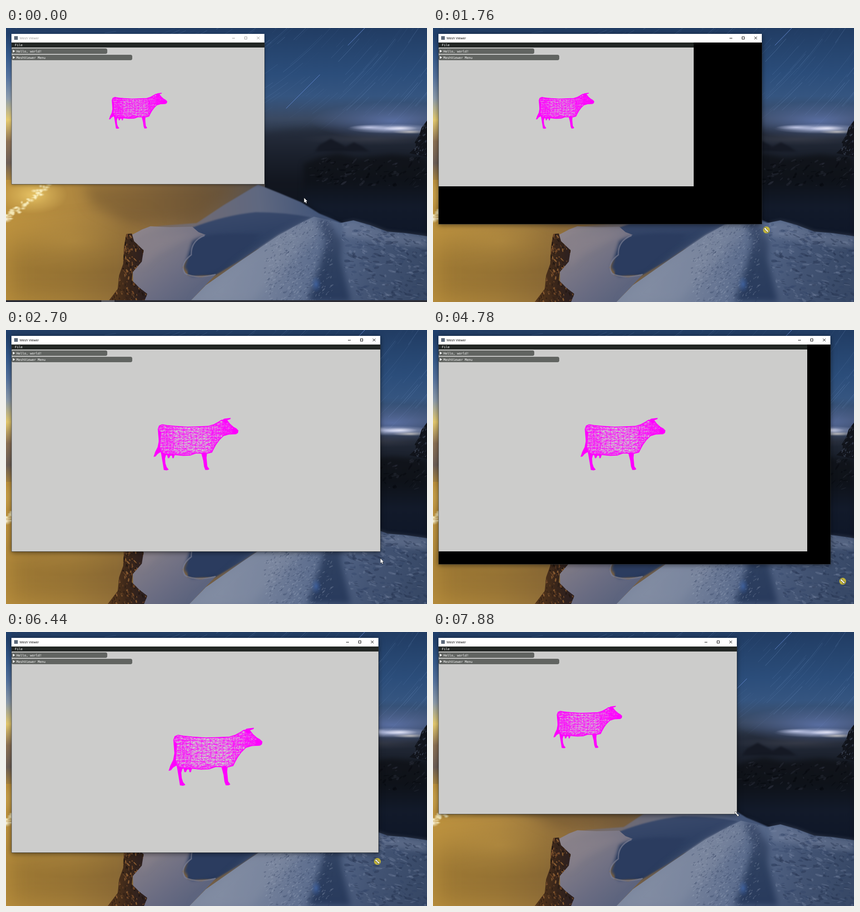
Write an HTML page with a canvas that moves like this. It is 927 px wide and 604 px high and loops after 8 s.

```html
<!DOCTYPE html>
<html lang="en">
<head>
<meta charset="utf-8">
<title>Mesh Viewer</title>
<style>
html, body { margin: 0; width: 100%; height: 100%; overflow: hidden; background: #141b28; }
canvas { display: block; }
</style>
</head>
<body>
<canvas id="stage" width="927" height="604"></canvas>
<script>
const W = 927, H = 604, LOOP = 8000;
const LEFT = 12, TOP = 13, CLIENT_TOP = 31;
const stage = document.getElementById('stage').getContext('2d');

let seed = 77;
const random = (min = 0, max = 1) => {
  seed = seed * 16807 % 2147483647;
  return min + (max - min) * seed / 2147483647;
};

// ---------- wallpaper ----------
function paintWallpaper() {
  const canvas = document.createElement('canvas');
  canvas.width = W;
  canvas.height = H;
  const c = canvas.getContext('2d');

  const linear = (x0, y0, x1, y1, ...colors) => {
    const g = c.createLinearGradient(x0, y0, x1, y1);
    colors.forEach((color, i) => g.addColorStop(i / (colors.length - 1), color));
    return g;
  };
  const shape = (path, fill, blur = 0) => {
    c.filter = blur ? `blur(${blur}px)` : 'none';
    c.fillStyle = fill;
    c.fill(new Path2D(path));
    c.filter = 'none';
  };
  const glow = (x, y, rx, ry, rgb, alpha = 1) => {
    const g = c.createRadialGradient(0, 0, 0, 0, 0, 1);
    g.addColorStop(0, `rgba(${rgb},${alpha})`);
    g.addColorStop(.5, `rgba(${rgb},${alpha * .45})`);
    g.addColorStop(1, `rgba(${rgb},0)`);
    c.save();
    c.translate(x, y);
    c.scale(rx, ry);
    c.fillStyle = g;
    c.fillRect(-1, -1, 2, 2);
    c.restore();
  };
  // Random flecks kept inside a shape
  const flecks = (path, count, [x0, y0, x1, y1], colors, size, tilt) => {
    c.save();
    c.clip(new Path2D(path));
    for (let i = 0; i < count; i++) {
      c.fillStyle = colors[i % colors.length];
      c.beginPath();
      c.ellipse(random(x0, x1), random(y0, y1), random(1, size), random(.5, size * .35), tilt + random(-.5, .5), 0, 7);
      c.fill();
    }
    c.restore();
  };

  // Sky and star trails
  c.fillStyle = linear(0, 0, 0, 300, '#213c63', '#26456f', '#2b4d7a', '#355580', '#3a4962', '#212936', '#151a23');
  c.fillRect(0, 0, W, H);
  c.lineCap = 'round';
  for (let i = 0; i < 620; i++) {
    const r = random(505, 1080), a = random(.5, 1.9);
    const y = -500 + r * Math.sin(a);
    if (y > 205) continue;
    c.strokeStyle = `rgba(140,175,225,${random(.05, .36) * Math.min(1, (215 - y) / 90)})`;
    c.lineWidth = random(.4, 1);
    c.beginPath();
    c.arc(150, -500, r, a, a + random(.03, .13));
    c.stroke();
  }
  c.strokeStyle = '#6488d2';
  c.lineWidth = 1;
  c.stroke(new Path2D('M617 177L691 103M753 38L790 0'));

  // Horizon
  shape('M560 235Q700 205 927 238V480H560Z', linear(0, 215, 0, 400, '#283040', '#1b212d', '#12161f', '#0f141f'), 8);
  glow(850, 205, 180, 42, '105,130,195', .65);
  glow(850, 222, 100, 11, '205,212,245', .85);
  glow(800, 219, 45, 6, '220,225,255', .7);
  glow(868, 221, 38, 6, '240,240,255', .8);
  glow(890, 229, 40, 5, '250,240,225', .6);
  glow(800, 245, 150, 14, '70,72,84', .5);
  shape('M690 258L706 249L715 244L730 252L748 262L766 252L786 262L800 272H680Z', '#151924', 2);
  const range = 'M655 300L690 285L730 277L775 287L850 279L927 286V470L700 420L655 380Z';
  shape(range, linear(0, 280, 0, 450, '#11141a', '#0e1219', '#121a2a', '#0f1728'), 6);
  flecks(range, 120, [665, 285, 925, 350], ['rgba(60,66,80,.25)', 'rgba(4,6,10,.4)'], 8, -.5);
  const crag = 'M927 204L915 220L910 236L900 252L903 262L888 276L927 284Z';
  shape(crag, '#10131a');
  flecks(crag, 50, [890, 215, 927, 280], ['#333b4a', '#1a1f2b'], 4, -1);

  // Golden valley
  c.fillStyle = linear(0, TOP, 0, 345, '#203f6a', '#34598b', '#5674a0', '#8e9dad', '#e6cb70', '#8d7256', '#6e6058', '#b88f3c');
  c.fillRect(0, 0, LEFT, 345);
  shape('M0 335H570V604H0Z', linear(0, 0, 570, 0, '#bd923e', '#b0883f', '#977440', '#785f40', '#55504f'));
  shape('M0 470Q150 450 300 430V604H0Z', 'rgba(95,68,28,.32)', 28);
  shape('M170 345H520L420 425L270 432L190 390Z', 'rgba(98,74,42,.4)', 14);
  glow(60, 368, 75, 42, '255,222,120', .65);
  for (let i = 0; i < 55; i++) {
    const u = random();
    glow(88 - 88 * u + random(-8, 8), 350 + 72 * u + random(-7, 7), random(3, 9), random(2, 5), '255,248,205', .8);
  }
  glow(0, 421, 14, 9, '255,250,225');
  glow(150, 470, 190, 70, '214,170,80', .3);

  // Far slope and blue hollow
  shape('M555 345L600 363L650 384L690 409L740 430L620 470L420 520L295 445L340 436L420 430L480 390Z',
    linear(320, 440, 680, 400, '#7b6a5e', '#6c6a76', '#5f6880', '#445679'), 1);
  shape('M410 440Q480 413 550 406Q610 406 672 417L600 455L520 510L460 545L400 545Z',
    linear(480, 405, 500, 545, '#3a4a6c', '#2d3f62', '#273859'), 1.5);
  const plateau = 'M277 456L300 444L318 437L360 439L410 438L424 450L440 456Q412 468 403 500L388 528L400 546L430 550L462 543L404 604H300L280 560Z';
  shape(plateau, linear(290, 440, 420, 600, '#8e858b', '#7d7986', '#6a6c82', '#58617c'), .6);
  shape('M295 480Q330 450 425 452Q390 470 330 500L300 530Z', 'rgba(145,135,142,.3)', 7);
  shape('M410 470Q440 448 560 455L470 535L410 548L392 528Z', '#2b3c5f', 3);
  c.strokeStyle = 'rgba(125,128,148,.65)';
  c.lineWidth = 3;
  c.setLineDash([2, 1.5]);
  c.stroke(new Path2D('M436 458Q407 470 408 500Q382 520 394 541Q420 554 462 543'));
  c.setLineDash([]);

  // Rock
  const rock = 'M265 454L277 453L282 470L303 490L299 515L279 538L277 556L293 572L311 586L304 604H224L246 575L249 545L258 520L260 480Z';
  shape(rock, linear(240, 0, 305, 0, '#50331a', '#38251a', '#2b1f20'));
  flecks(rock, 320, [225, 455, 310, 604], ['#6f4626', '#221711', '#855930', '#352216'], 5, 1.3);

  // Near ridge with the beaten track
  const ridge = 'M404 604L440 567L520 511L600 457L645 432L678 416L715 424L735 430L765 424L800 434L840 449L880 452L927 459V604Z';
  shape(ridge, linear(500, 480, 900, 590, '#7d889f', '#717e99', '#56688a', '#435474', '#384967'), .5);
  shape('M684 417L712 425L740 470L738 510L760 604H665L692 520L704 470Z', linear(0, 420, 0, 604, '#435272', '#2e4060', '#283a5c'), 7);
  shape('M600 457L678 418L690 450L640 500L540 604H410L520 511Z', 'rgba(140,148,168,.3)', 9);
  flecks(ridge, 700, [570, 425, 720, 604], ['rgba(160,170,190,.25)', 'rgba(42,56,86,.28)'], 4, -.7);
  const bumps = 'M740 432L765 425L800 434L840 449L927 459V604H770L738 510Z';
  shape('M742 430L765 425L800 434L840 449L927 459V485Q830 475 745 460Z', 'rgba(125,138,166,.4)', 5);
  flecks(bumps, 420, [740, 428, 927, 604], ['rgba(125,140,170,.28)', 'rgba(28,42,68,.32)', 'rgba(44,62,98,.28)'], 9, .2);
  glow(683, 565, 12, 18, '80,140,245', .35);
  return canvas;
}

function drawTaskbar(c) {
  c.fillStyle = '#2b2c34';
  c.fillRect(0, 600, W, 4);
  c.fillStyle = '#5b5c62';
  c.fillRect(210, 600, 29, 4);
}

// ---------- cow, laid out for a client area 898 px wide ----------
const COW_WIDTH = 898;
const cowBody = new Path2D('M369 238L372 230L379 227L390 229L410 231L440 233L470 232L492 231L505 227L516 221L524 216L537 217L544 226L552 233L559 237L564 242L563 247L559 250L541 251L528 255L518 265L510 276L504 287L500 295L488 298L462 297L448 302L430 303L410 301L388 301L377 297L373 285L371 262Z');
const cowSolid = new Path2D('M370 240L376 245L374 285L376 294L368 299L363 305L358 306L362 294L368 282L371 266Z' +
  'M376 295L389 299L386 310L387 322L390 331L395 337L390 339L383 338L381 325Z' +
  'M391 301L393 309H396L399 303L403 303L404 309H407L410 300Z' +
  'M474 296L488 297L487 308L489 329L494 336L490 338L484 338L481 330L479 315Z' +
  'M523 218L530 213L546 211L545 214L536 217L541 222L534 224Z' +
  'M551 235L564 242L563 248L558 250L549 249Z');

// Triangulated jittered grid, each edge drawn once
function meshPath(x0, y0, x1, y1, dx, dy) {
  const path = new Path2D();
  const rows = [];
  for (let y = y0; y <= y1; y += dy) {
    const row = [];
    for (let x = x0; x <= x1; x += dx) row.push([x + random(-.3, .3) * dx, y + random(-.3, .3) * dy]);
    rows.push(row);
  }
  rows.slice(1).forEach((row, j) => row.slice(1).forEach((p, i) => {
    const above = rows[j], flip = random() < .5;
    path.moveTo(...above[i + 1]);
    path.lineTo(...p);
    path.lineTo(...row[i]);
    path.moveTo(...(flip ? row[i] : p));
    path.lineTo(...(flip ? above[i + 1] : above[i]));
  }));
  return path;
}
const cowMesh = [
  meshPath(360, 220, 575, 310, 10, 6.5),
  meshPath(364, 222, 575, 310, 14, 9),
  meshPath(494, 205, 575, 305, 5.5, 6),
  meshPath(524, 205, 575, 260, 4, 4),
  meshPath(366, 222, 410, 305, 8, 8),
  meshPath(366, 294, 500, 306, 8, 4)
];

function drawCow(c, clientWidth, shift) {
  const k = clientWidth / COW_WIDTH;
  c.save();
  c.translate(LEFT, CLIENT_TOP + shift);
  c.scale(k, k);
  c.translate(-LEFT, -CLIENT_TOP);
  c.strokeStyle = c.fillStyle = '#ff00ff';
  c.lineJoin = 'round';
  c.fill(cowSolid);
  c.lineWidth = 1.2 / k;
  c.stroke(cowBody);
  c.clip(cowBody);
  c.lineWidth = 2.4 / k;
  c.stroke(cowBody);
  c.lineWidth = .75 / k;
  cowMesh.forEach(mesh => c.stroke(mesh));
  c.restore();
}

// ---------- timeline ----------
const windowRight = [[0, 569], [1230, 569], [1280, 576], [1760, 724], [2010, 783], [2350, 824], [4490, 824],
  [4780, 875], [4870, 910], [6280, 910], [6680, 686], [7020, 669]];
const pointer = [[0, 656, 374], [50, 656, 374], [850, 569, 345], [1230, 569, 345], [1760, 734, 445], [2010, 787, 473],
  [2350, 826, 490], [2400, 825, 489], [2700, 824, 503], [3130, 824, 503], [3860, 820, 485], [4250, 820, 485],
  [4350, 824, 488], [4490, 824, 488], [4780, 902, 554], [4870, 912, 540], [5250, 911, 538], [5440, 908, 553],
  [5600, 909, 554], [6030, 910, 536], [6280, 910, 536], [6680, 681, 461], [7020, 669, 401], [7250, 669, 401],
  [7550, 653, 457], [7880, 669, 401]];
const pointerKind = [[0, 'arrow'], [900, 'resize'], [1230, 'drag'], [2400, 'arrow'], [4300, 'resize'], [4490, 'drag'],
  [5250, 'arrow'], [6000, 'resize'], [6280, 'drag'], [7020, 'resize'], [7300, 'arrow'], [7850, 'resize']];
const clientRight = [[0, 569], [2400, 824], [5250, 910], [7020, 669]];
const VIEWPORT_DELAY = 90;
const TASKBAR_END = 50;

const held = (keys, t) => keys.findLast(key => key[0] <= t) || keys[0];
function tween(keys, t) {
  const i = keys.findLastIndex(key => key[0] <= t);
  const a = keys[i], b = keys[i + 1];
  if (!b) return a.slice(1);
  const u = (t - a[0]) / (b[0] - a[0]);
  return a.slice(1).map((v, n) => v + (b[n + 1] - v) * u);
}
// The client area keeps a 16:9 shape
const bottomFor = right => Math.round(CLIENT_TOP + (right - LEFT) * 9 / 16);

// ---------- window ----------
function drawWindow(c, t) {
  const active = t >= 1230;
  const right = Math.round(tween(windowRight, t)[0]);
  const bottom = bottomFor(right);
  const width = right - LEFT, height = bottom - TOP;

  c.save();
  c.shadowColor = `rgba(0,0,0,${active ? .55 : .35})`;
  c.shadowBlur = active ? 11 : 7;
  c.shadowOffsetY = 2;
  c.fillStyle = '#000';
  c.fillRect(LEFT, TOP, width, height);
  c.restore();

  c.save();
  c.beginPath();
  c.rect(LEFT, TOP, width, height);
  c.clip();
  c.fillStyle = '#fff';
  c.fillRect(LEFT, TOP, width, 19);
  c.fillStyle = '#5d6a7a';
  c.fillRect(18, 18, 8, 8);
  c.fillStyle = c.strokeStyle = active ? '#000' : '#999';
  c.font = '7.2px "Open Sans", sans-serif';
  c.fillText('Mesh Viewer', 30, 25);
  c.lineWidth = 1;
  c.strokeRect(right - 43.5, 19.5, 5, 5);
  c.beginPath();
  c.moveTo(right - 71, 22.5);
  c.lineTo(right - 65, 22.5);
  c.moveTo(right - 16.5, 19);
  c.lineTo(right - 10.5, 25);
  c.moveTo(right - 10.5, 19);
  c.lineTo(right - 16.5, 25);
  c.stroke();

  const drawn = held(clientRight, t)[1];
  const firstDrag = active && t < 2400 ? 5 : 0;
  const drawnWidth = drawn + firstDrag - LEFT;
  c.fillStyle = '#cccccb';
  c.fillRect(LEFT, 32, drawnWidth, bottomFor(drawn) + firstDrag - 32);
  c.fillStyle = '#232725';
  c.fillRect(LEFT, 32, drawnWidth, 11);
  c.font = '7.1px "DejaVu Sans Mono", monospace';
  c.fillStyle = '#fff';
  c.fillText('File', 19.5, 40);
  drawHeader(c, 45, 223, 'Hello, world!');
  drawHeader(c, 59, 278, 'MeshViewer Menu');

  // The viewport follows a resize late and stays tied to the lower edge until then
  const viewport = held(clientRight, t - VIEWPORT_DELAY)[1];
  drawCow(c, viewport - LEFT, bottomFor(drawn) - bottomFor(viewport));
  c.restore();

  c.strokeStyle = 'rgba(50,54,58,.65)';
  c.lineWidth = 1;
  c.stroke(new Path2D(`M${LEFT + .5} 32V${bottom + .5}H${right + .5}V32`));
}

function drawHeader(c, y, right, label) {
  c.fillStyle = '#616461';
  c.beginPath();
  c.roundRect(LEFT, y, right - LEFT, 12, 4);
  c.fill();
  c.fillStyle = '#fff';
  c.fill(new Path2D(`M15 ${y + 3}L20 ${y + 6}L15 ${y + 9}Z`));
  c.fillText(label, 23, y + 8.6);
}

// ---------- pointer ----------
const arrow = new Path2D('M.5 .5V11L2.9 8.8L4.6 12.5L6.2 11.8L4.6 8H7.6Z');
const resizer = new Path2D('M-4.5 -4H-.5L-1.7 -2.8L2.8 1.7L4 .5V4.5H0L1.2 3.3L-3.3 -1.2L-4.5 0Z');

function drawPointer(c, t) {
  const kind = held(pointerKind, t)[1];
  c.save();
  c.translate(...tween(pointer, t));
  if (kind === 'drag') {
    c.fillStyle = 'rgba(214,196,48,.85)';
    c.beginPath();
    c.arc(0, 0, 7.5, 0, 7);
    c.fill();
  }
  const path = kind === 'arrow' ? arrow : resizer;
  c.strokeStyle = '#000';
  c.fillStyle = '#fff';
  c.lineWidth = 1;
  c.stroke(path);
  c.fill(path);
  c.restore();
}

const wallpaper = paintWallpaper();
const start = performance.now();
function frame() {
  const t = (performance.now() - start) % LOOP;
  stage.drawImage(wallpaper, 0, 0);
  if (t < TASKBAR_END) drawTaskbar(stage);
  drawWindow(stage, t);
  drawPointer(stage, t);
  requestAnimationFrame(frame);
}
frame();
</script>
</body>
</html>
```
